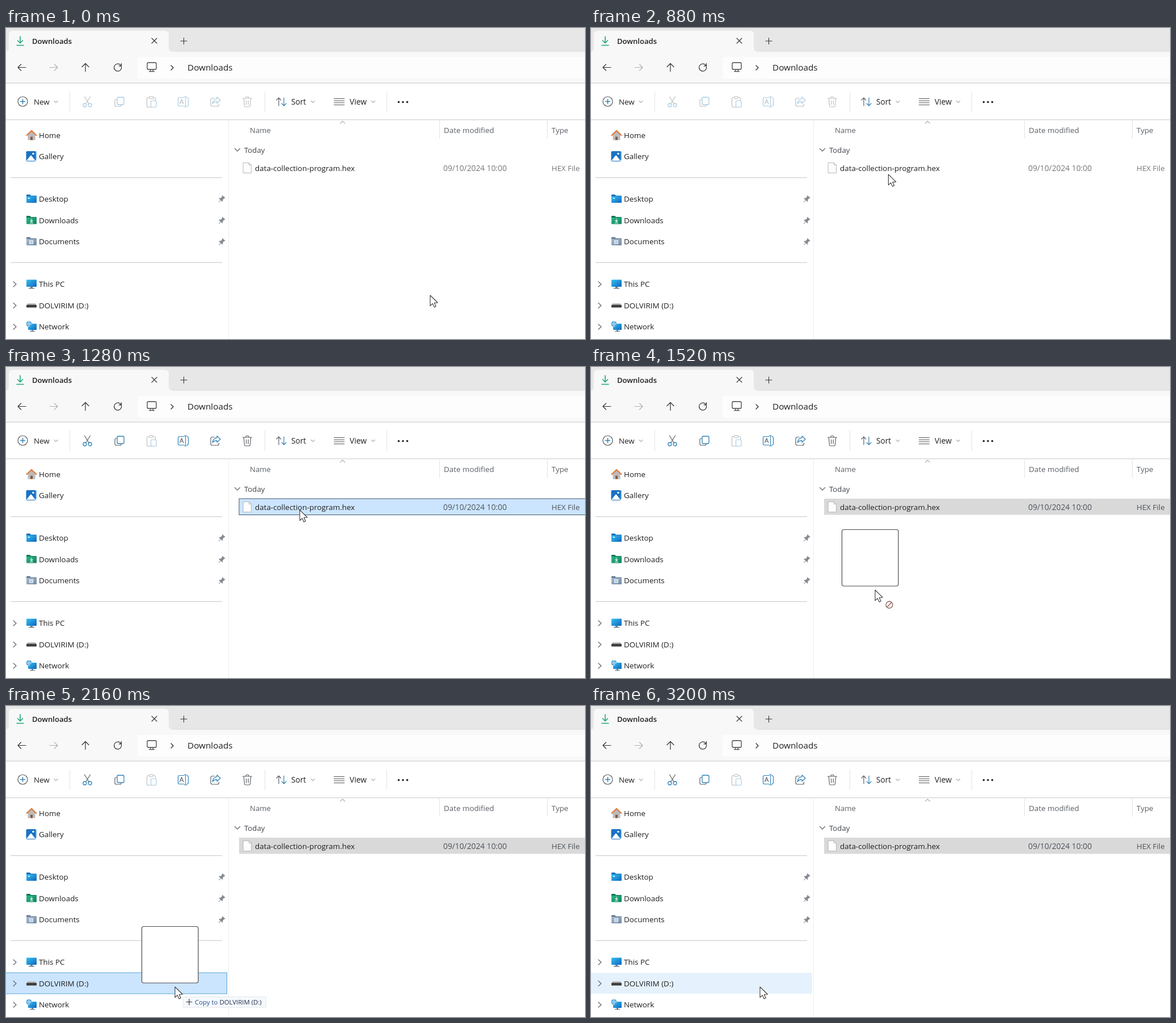
Recreate the animation shown at these times as an HTML page. Size 1021 by 548 pixels, loop 3.28 s.

```html
<!DOCTYPE html>
<html lang="en">
<head>
<meta charset="utf-8">
<title>Drag a file to a drive</title>
<style>
  html, body { margin: 0; width: 100%; height: 100%; overflow: hidden; background: #fff; }
  svg { display: block; width: 1021px; height: 548px; }
  text { font-family: "Open Sans", "Noto Sans", sans-serif; }
</style>
</head>
<body>
<svg id="stage" viewBox="0 0 1021 548" xmlns="http://www.w3.org/2000/svg"></svg>
<script>
const LOOP = 3280, STEP = 80;
const HOVER = 960, SELECT = 1200, DRAG = 1360, OVER = 2000, DROP = 2560;
const DRIVE = 'DOLVIRIM (D:)';
const INK = '#1f1f1f', BLUE = '#2f83b8', GREY = '#5f6368';

// Text is placed by its left edge and the middle of its capitals.
const label = (x, y, s, size = 13.4, fill = INK, extra = '') =>
  `<text x="${x}" y="${y + size * 0.357}" font-size="${size}" fill="${fill}" ${extra}>${s}</text>`;
const rect = (x, y, w, h, fill, extra = '') =>
  `<rect x="${x}" y="${y}" width="${w}" height="${h}" fill="${fill}" ${extra}/>`;
const line = (d, color = '#444', width = 1.2, extra = '') =>
  `<path d="${d}" fill="none" stroke="${color}" stroke-width="${width}" stroke-linecap="round" stroke-linejoin="round" ${extra}/>`;
const fill = (d, color, extra = '') => `<path d="${d}" fill="${color}" ${extra}/>`;
const at = (x, y, body, extra = '') => `<g transform="translate(${x} ${y})" ${extra}>${body}</g>`;
const group = (id, body) => `<g id="${id}">${body}</g>`;

const gradient = (id, a, b) =>
  `<linearGradient id="${id}" x1="0" y1="0" x2="1" y2="1"><stop stop-color="${a}"/><stop offset="1" stop-color="${b}"/></linearGradient>`;

const defs = '<defs>' +
  gradient('sky', '#35c1ee', '#0e65c0') +
  gradient('green', '#2fb984', '#0d8060') +
  gradient('slate', '#a9bdd2', '#7089a5') + '</defs>';

const chevron = (x, y) => at(x, y, line('M-2.5-4.5L2.5 0L-2.5 4.5', '#666'));
const caret = (x, y) => at(x, y, line('M-3-1.5L0 1.5L3-1.5', '#777', 1));

const folder = (y, paint, back, mark) => at(45, y,
  fill('M-9-6.5Q-9-7.5-8-7.5H-3L-1-5.5H8Q9-5.5 9-4.5V0H-9Z', back) +
  rect(-9, -4.5, 18, 11.5, `url(#${paint})`, 'rx="1"') + mark);

const monitor = (x, y) => at(x, y,
  rect(-9, -8, 18, 12.5, 'url(#sky)', 'rx="1"') +
  fill('M-2 4.5H2V6.5H5V8H-5V6.5H-2Z', '#6f8494'));

const pin = y => at(380, y,
  fill('M-1-6H4V-5L3-4V0L5 2V3H1V8H0V3H-4V2L-2 0V-4L-3-5V-6Z', '#858b92', 'transform="rotate(42) scale(.95)"'));

function windowBar() {
  return rect(0, 0, 1021, 42, '#e7e7e7') +
    rect(0, 41, 1021, 56, '#f8f8f8') +
    fill('M0 41.5Q5 41 5 35V12Q5 5 12 5H280Q287 5 287 12V35Q287 41 293 41.5Z', '#f8f8f8') +
    line('M293 41.2H1021', '#dcdcdc', 1) +
    rect(232, 51, 800, 38, '#fdfdfd', 'rx="4"') +
    at(25, 23, line('M0-8V3M-4.5-1L0 3.5L4.5-1', '#1fa67a', 1.6) + line('M-6 7.5H6', '#1fa67a', 1.6)) +
    label(46, 23, 'Downloads', 13.1, INK, 'font-weight="600"') +
    at(261.5, 22.5, line('M-4.5-4.5L4.5 4.5M4.5-4.5L-4.5 4.5', '#333', 1.1)) +
    at(313.5, 23, line('M-5.5 0H5.5M0-5.5V5.5', '#333', 1.1)) +
    at(28, 69.5, line('M7 0H-7M-1.5-5.5L-7 0L-1.5 5.5', '#333')) +
    at(84, 69.5, line('M-7 0H7M1.5-5.5L7 0L1.5 5.5', '#b3b3b3')) +
    at(140, 69.5, line('M0 7V-7M-6-1L0-7L6-1', '#333')) +
    at(197, 69.5, line('M6.4-1.5A6.5 6.5 0 1 1 3.8-5.2L6.2-3M6.4-7V-2.7H2.2', '#333')) +
    at(257, 68.5, rect(-8, -7.5, 16, 12, 'none', 'rx="2" stroke="#444" stroke-width="1.3"') +
      line('M-2.2 5V8M2.2 5V8M-4.5 8.2H4.5', '#444')) +
    at(293, 70, line('M-2-4L2 0L-2 4', '#333', 1.4)) +
    label(320, 70, 'Downloads', 15.3) +
    rect(0, 96.5, 1021, 1.2, '#d0d0d0');
}

function toolbar() {
  const cut = at(143.5, 130,
    line('M-5-9L3 4M5-9L-3 4', GREY) +
    '<g fill="none" stroke="#2f83b8" stroke-width="1.3"><circle cx="-4.6" cy="6" r="3"/><circle cx="4.6" cy="6" r="3"/></g>');
  const copy = at(200, 130,
    line('M-4-4H-6Q-8-4-8-2V5.5Q-8 8 -5.5 8H1Q3 8 3 6', GREY) +
    rect(-4, -8, 12, 13, '#fff', 'rx="2.2" stroke="#2f83b8" stroke-width="1.3"'));
  const paste = at(256.5, 130,
    rect(-8, -7.5, 15, 17, 'none', 'rx="2" stroke="#5f6368" stroke-width="1.2"') +
    rect(-4, -9.5, 7, 4, '#fff', 'rx="1.5" stroke="#5f6368" stroke-width="1.1"') +
    rect(-1, -2, 9.5, 11.5, '#fff', 'rx="1.8" stroke="#2f83b8" stroke-width="1.2"'));
  const rename = at(312.5, 130,
    line('M1.5-7.5H-6.5Q-9-7.5-9-5V5Q-9 7.5-6.5 7.5H1.5M6.5-7.5Q9-7.5 9-5V5Q9 7.5 6.5 7.5', BLUE) +
    line('M-6 3.5L-2.8-4.5L.4 3.5M-4.8 1H-.9', GREY, 1.1) +
    line('M4-9V9M2-9H6M2 9H6', BLUE, 1.1));
  const share = at(369, 130,
    line('M-2-6.5H-5Q-8-6.5-8-3.5V5Q-8 8-5 8H3.5Q6.5 8 6.5 5V4', GREY) +
    line('M3-8.5L9-2.8L3 2.8V-.4Q-2.5-.6-4.8 3.5Q-4-4.8 3-5.4Z', BLUE));
  const bin = at(425.5, 130,
    line('M-8-6H8M-2.8-6.2Q-2.5-9 0-9Q2.5-9 2.8-6.2M-6.2-5.8L-5 7Q-4.8 9-3 9H3Q4.8 9 5 7L6.2-5.8M-1.8-2V5M1.8-2V5', GREY));
  const gap = x => rect(x, 112, 1, 36, '#e3e3e3');

  return rect(0, 98, 1021, 64, '#fff') +
    at(29.5, 129.5, '<circle r="8.5" fill="none" stroke="#555" stroke-width="1.2"/>' + line('M-4 0H4M0-4V4', BLUE, 1.5)) +
    label(49, 130.5, 'New') + caret(88, 130) + gap(112) +
    group('actions', cut + copy + rename + share + bin) + `<g opacity=".4">${paste}</g>` +
    gap(456) +
    at(485.5, 130, line('M-4.5 7V-7M-8.5-3L-4.5-7L-.8-3', GREY) + line('M4.5-7V7M.8 3L4.5 7L8.5 3', BLUE)) +
    label(503, 130.5, 'Sort', 13.6) + caret(541, 130) +
    at(587.5, 130, line('M-9-5.5H9M-9-1.8H9M-9 1.8H9M-9 5.5H9', '#555', 1.1)) +
    label(606, 130.5, 'View', 13.8) + caret(647.5, 130) + gap(671) +
    [692.5, 700, 707.5].map(x => `<circle cx="${x}" cy="130.5" r="1.8" fill="#222"/>`).join('') +
    rect(0, 161, 1021, 1.3, '#d4d4d4');
}

function sidebar() {
  const home = at(45, 188.5,
    fill('M-6.5-1L0-7L6.5-1V9H2V3H-2V9H-6.5Z', '#b9bcc0') + rect(-2, 3, 4, 6, '#8a5a3a') +
    line('M-8.3 .5L0-7.5L8.3 .5', '#e07b39', 2.4));
  const gallery = at(45, 226,
    rect(-7, -9, 16, 16, '#7dc0ee', 'rx="2"') + rect(-9.5, -9, 17, 18, '#1a72c4', 'rx="2"') +
    fill('M-9 8L-2-1Q-1-2 0-1L7 8Z', '#fff') + '<circle cx="3" cy="-4.5" r="1.8" fill="#fff"/>');
  const network = at(45, 526,
    rect(-6, -5, 15, 11, 'url(#sky)', 'rx="1"') + fill('M0 6H3V8H6V9.2H-3V8H0Z', '#6f8494') +
    '<circle cx="-4.5" cy="-4.5" r="5" fill="#4aa3d8"/>' +
    line('M-9-4.5H0M-4.5-9.3Q-8-4.5-4.5 .3Q-1-4.5-4.5-9.3', '#d5eefb', .9));
  const drive = at(45, 489, fill('M-7-3.5H7L9 0H-9Z', '#a8a8a8') + rect(-9, -1, 18, 4.5, '#3d3d3d', 'rx=".8"'));

  return rect(392, 163, 1, 385, '#eeeeee') +
    rect(8, 263, 373, 1.2, '#cfcfcf') + rect(8, 412.7, 373, 1.2, '#cfcfcf') +
    '<rect id="dropRow" x="-1" y="470" width="390.5" height="37"/>' +
    home + gallery +
    folder(301, 'sky', '#0d69b8', rect(-6, -2, 3, 2, '#d9f3ff')) +
    folder(338.5, 'green', '#0c7557', line('M0-2V3M-2 1L0 3L2 1M-2.5 5H2.5', '#fff', 1.1)) +
    folder(376, 'slate', '#62798f', rect(-4, -2, 7, 6.5, '#eef4fa') + line('M-2.5 0H1.5M-2.5 2.3H1.5', '#7b93ab', .9)) +
    monitor(45, 451.5) + drive + network +
    [301, 339, 376.5].map(pin).join('') +
    [451.5, 489, 526.5].map(y => chevron(15.5, y)).join('') +
    [['Home', 189], ['Gallery', 226.5], ['Desktop', 301.5], ['Downloads', 339], ['Documents', 376.5],
     ['This PC', 451.5], [DRIVE, 489], ['Network', 526.5]].map(([s, y]) => label(58, y, s)).join('');
}

function fileList() {
  return label(430, 180, 'Name', 13.2, '#5a5f66') + label(772, 180, 'Date modified', 13.4, '#5a5f66') +
    label(962, 180, 'Type', 13.4, '#5a5f66') +
    rect(764, 163, 1, 32, '#e2e2e2') + rect(954, 163, 1, 32, '#e2e2e2') +
    at(593.5, 166, line('M-4 2L0-2L4 2', '#777', 1)) +
    at(408, 214.5, line('M-4.5-2L0 2.5L4.5-2', '#666')) + label(420, 215.5, 'Today', 13.2, '#3f444a') +
    '<rect id="fileRow" x="411" y="232" width="620" height="28.5"/>' +
    at(425.5, 246.5, line('M-7-9H3L7-5V9H-7Z', '#b8b8b8', 1, 'style="fill:#fdfdfd"') + line('M3-9V-5H7', '#b8b8b8', 1)) +
    label(439, 247.5, 'data-collection-program.hex') +
    group('details', label(771, 247.5, '09/10/2024 10:00', 13.8, 'inherit') + label(962, 247.5, 'HEX File', 13.4, 'inherit'));
}

const pointer = group('pointer',
  group('ghost', rect(-58.5, -106.5, 99.5, 99.5, '#fff', 'rx="3.5" stroke="#4a4a4a" stroke-width="1.2"')) +
  group('denied', at(25, 26, '<circle r="6" fill="#f8efec" stroke="#8c6a62" stroke-width="1.3"/>' + line('M-4 4L4-4', '#8c6a62', 1.3))) +
  group('tip', rect(14.5, 17.5, 146, 18.5, '#f6f9fd', 'rx="2" stroke="#e3e6ea"') +
    at(25, 26.5, line('M-5 0H5M0-5V5', '#333')) +
    label(35, 27, `Copy to <tspan fill="#22304f">${DRIVE}</tspan>`, 11.4, '#27508f')) +
  line('M0 0V18.5L4.3 14.6L7.2 21L10.2 19.6L7.4 13.4L13.3 13Z', '#3a3a3a', 1.1, 'style="fill:#fff"'));

const stage = document.getElementById('stage');
stage.innerHTML = defs + rect(0, 0, 1021, 548, '#fff') + windowBar() + toolbar() + sidebar() + fileList() + pointer;

const el = id => document.getElementById(id);
const set = (id, attrs) => { for (const k in attrs) el(id).setAttribute(k, attrs[k]); };
const show = (id, on) => set(id, { visibility: on ? 'visible' : 'hidden' });

const start = [748, 471], grab = [518, 252];
const path = [[1280, ...grab], [1520, 501, 393], [1840, 414, 473], [2160, 298, 495]];

// Speed along the drag path: at rest at both ends, central difference between.
const speed = (i, axis) => i === 0 || i === path.length - 1 ? 0 :
  (path[i + 1][axis] - path[i - 1][axis]) / (path[i + 1][0] - path[i - 1][0]);

function dragPoint(t, axis) {
  let i = 0;
  while (i < path.length - 2 && t >= path[i + 1][0]) i++;
  const a = path[i], b = path[i + 1], span = b[0] - a[0];
  const u = Math.min(1, (t - a[0]) / span), s = u * u * (3 - 2 * u);
  return a[axis] + (b[axis] - a[axis]) * s +
    span * u * (1 - u) * ((1 - u) * speed(i, axis) - u * speed(i + 1, axis));
}

function cursor(t) {
  if (t >= path[0][0]) return [dragPoint(t, 1), dragPoint(t, 2)];
  const u = Math.min(1, Math.max(0, (t - 160) / 800)), s = u * u * (3 - 2 * u);
  return start.map((v, i) => v + (grab[i] - v) * s);
}

function fileRowStyle(t) {
  if (t >= DRAG) return ['#d9d9d9', 'none'];
  if (t >= SELECT) return ['#cce5ff', '#3e5a75'];
  return [t >= HOVER ? '#e5f2fd' : 'none', 'none'];
}

function dropRowStyle(t) {
  if (t >= DROP) return ['#e5f2fd', 'none'];
  return t >= OVER ? ['#cce5ff', '#55a5d6'] : ['none', 'none'];
}

function render(t) {
  const [x, y] = cursor(t), dragging = t >= DRAG && t < DROP;
  const paint = ([color, stroke]) => ({ fill: color, stroke });
  set('pointer', { transform: `translate(${x} ${y})` });
  set('fileRow', paint(fileRowStyle(t)));
  set('dropRow', paint(dropRowStyle(t)));
  set('actions', { opacity: t >= SELECT ? 1 : 0.4 });
  set('details', { fill: t >= SELECT ? '#4c535b' : '#73777c' });
  for (const node of el('details').children) node.removeAttribute('fill');
  show('ghost', dragging);
  show('denied', dragging && t < OVER);
  show('tip', dragging && t >= OVER);
}

const began = performance.now();
function tick() {
  const t = (performance.now() - began) % LOOP;
  render(Math.floor(t / STEP) * STEP);
  requestAnimationFrame(tick);
}
tick();
</script>
</body>
</html>
```
